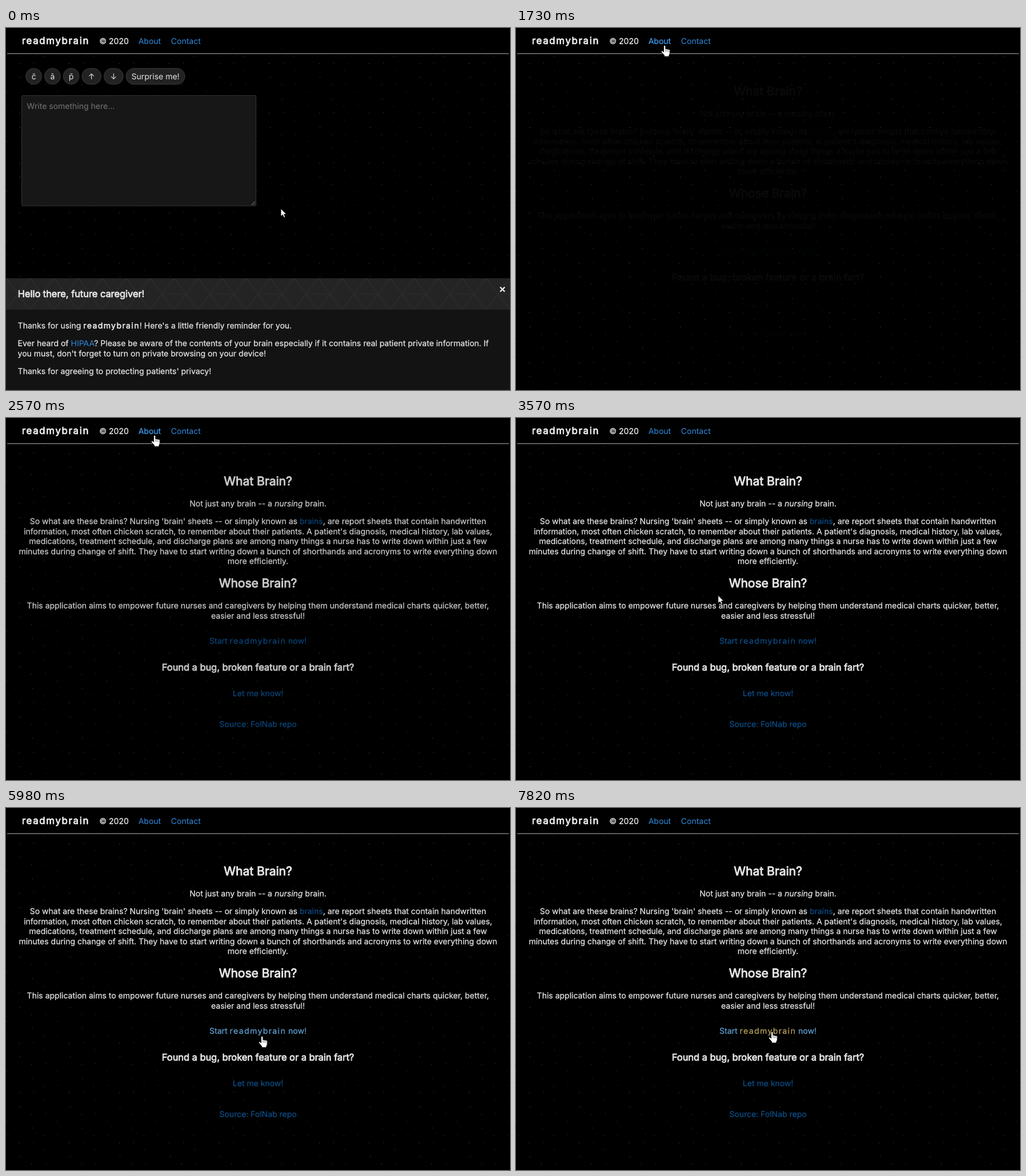
An HTML page for the animation above (8000 ms loop, 882 px wide and 635 px high).

```html
<!DOCTYPE html>
<html lang="en">
<head>
<meta charset="utf-8">
<title>readmybrain</title>
<style>
  html, body { margin: 0; width: 100%; height: 100%; overflow: hidden; background: #000; }
  svg { display: block; width: 882px; height: 635px; }
  text {
    font: 400 14px Inter, "Open Sans", sans-serif;
    font-optical-sizing: none;
    text-rendering: geometricPrecision;
    fill: #e6e6e6;
  }
  .mid text { text-anchor: middle; }
  .body text { stroke: #e6e6e6; stroke-width: .25px; }
  .body text.h2 { font-size: 21px; stroke-width: .95px; }
  .body text.h3 { font-size: 16.38px; stroke-width: .8px; }
  .logo { letter-spacing: .1em; }
  .nav text { fill: #2f8adf; }
  .nav text.plain { fill: #f0f0f0; stroke: #f0f0f0; stroke-width: .25px; }
  .nav text.logo { font-size: 16.8px; stroke-width: .8px; }
  .nav text.hover { fill: #3fa2f7; stroke: #3fa2f7; stroke-width: .2px; }
  .body .link { fill: #0d5290; stroke: #0d5290; stroke-width: .15px; }
  .body .link.hover { fill: #62a0d2; stroke: #62a0d2; stroke-width: .25px; }
  .body .blue { fill: #2f8adf; stroke: none; }
  .body .strong { stroke-width: .6px; }
  .pill { fill: #222; stroke: #363636; }
  .halo { fill: #161616; }
</style>
</head>
<body>
<svg viewBox="0 0 882 635">
  <defs>
    <pattern id="stars" width="175" height="175" patternUnits="userSpaceOnUse"></pattern>
    <pattern id="tri" width="84" height="56" patternUnits="userSpaceOnUse" y="439">
      <path d="M0 56L42 0L84 56M21 28H63L42 56ZM0 0L21 28M84 0L63 28M0 56H84" fill="none" stroke="#2d2d2d" stroke-width="1.2"/>
    </pattern>
  </defs>
  <rect width="882" height="635"/>
  <rect width="882" height="635" fill="url(#stars)"/>
  <rect width="882" height="44" opacity=".6"/>

  <g class="nav">
    <text class="plain logo" x="27.9" y="28">readmybrain</text>
    <text class="plain" x="163.3" y="28">© 2020</text>
    <text id="about" x="231.7" y="28">About</text>
    <text x="288.8" y="28">Contact</text>
    <rect x="2" y="44" width="878" height="1.75" fill="#686c6a"/>
  </g>

  <g id="home">
    <g id="pills" class="mid"></g>
    <rect id="area" x="27.5" y="118.5" width="410" height="193.5" rx="1.5" fill="#171717" stroke="#333"/>
    <text x="36.6" y="142" style="fill:#757575">Write something here...</text>
    <path d="M429.5 310.5L436 304M433 310.5L436 307.5" stroke="#999" stroke-width=".9"/>
    <rect y="439" width="882" height="55" fill="#242424"/>
    <rect y="439" width="882" height="55" fill="url(#tri)"/>
    <rect y="494" width="882" height="141" fill="#131313"/>
    <path d="M864.8 454.5l8 8m0-8l-8 8" stroke="#f2f2f2" stroke-width="2.3"/>
    <g class="body">
      <text class="h3" x="20.8" y="472">Hello there, future caregiver!</text>
      <text x="20.6" y="527">Thanks for using <tspan class="logo strong">readmybrain</tspan>! Here's a little friendly reminder for you.</text>
      <text x="20.6" y="558">Ever heard of <tspan class="blue">HIPAA</tspan>? Please be aware of the contents of your brain especially if it contains real patient private information. If</text>
      <text x="20.6" y="575.5">you must, don't forget to turn on private browsing on your device!</text>
      <text x="20.6" y="607">Thanks for agreeing to protecting patients' privacy!</text>
    </g>
  </g>

  <g id="info" class="mid body">
    <text class="h2" x="441" y="118">What Brain?</text>
    <text x="441" y="155">Not just any brain -- a <tspan font-style="italic">nursing</tspan> brain.</text>
    <text x="441" y="186">So what are these brains? Nursing 'brain' sheets -- or simply known as <tspan id="brains" class="link">brains</tspan>, are report sheets that contain handwritten</text>
    <text x="441" y="204">information, most often chicken scratch, to remember about their patients. A patient's diagnosis, medical history, lab values,</text>
    <text x="441" y="221">medications, treatment schedule, and discharge plans are among many things a nurse has to write down within just a few</text>
    <text x="441" y="239">minutes during change of shift. They have to start writing down a bunch of shorthands and acronyms to write everything down</text>
    <text x="441" y="256">more efficiently.</text>
    <text class="h2" x="441" y="297">Whose Brain?</text>
    <text x="441" y="334">This application aims to empower future nurses and caregivers by helping them understand medical charts quicker, better,</text>
    <text x="441" y="351.5">easier and less stressful!</text>
    <text id="start" class="link" x="441" y="396">Start <tspan id="brand" class="logo">readmybrain</tspan> now!</text>
    <text class="h3" x="441" y="442.5">Found a bug, broken feature or a brain fart?</text>
    <text class="link" x="441" y="488">Let me know!</text>
    <text class="link" x="441" y="542">Source: FolNab repo</text>
  </g>

  <g id="status">
    <rect y="621" width="290" height="14" fill="#292a2d"/>
    <text x="4" y="631.6" style="font-size:10.5px;fill:#bdc1c6">https://example.org/nursing-brain-report-sheets</text>
  </g>
  <circle id="click" cx="259" cy="30" r="13" fill="#ffee00" opacity=".53"/>
  <g id="cursor" stroke="#000" stroke-width=".8">
    <path id="arrow" d="M0 0V13.5L3.2 10.6L5.4 15.4L7.6 14.5L5.5 9.7H9.6Z" fill="#fff"/>
    <g id="hand" transform="translate(-5 0)">
      <path d="M4.5 2a1.6 1.6 0 0 1 3.2 0V7.2a1.4 1.4 0 0 1 2.6.4a1.4 1.4 0 0 1 2.5.6a1.3 1.3 0 0 1 2.4.9V14q0 2-1.4 3.6V20H5.6V18L1 12.6q-1.2-1.6 0-2.4q1.1-.7 2.4.8l1.1 1.2Z" fill="#fff"/>
      <path d="M7.8 8v3.5M10.3 8.6v3M12.8 9.4v2.3" stroke-width=".6"/>
    </g>
  </g>
</svg>
<script>
const LOOP = 8000;
const $ = id => document.getElementById(id);
const clamp = v => Math.max(0, Math.min(1, v));
const mix = (a, b, f) => a + (b - a) * f;

function add(parent, tag, attrs, text) {
  const el = document.createElementNS('http://www.w3.org/2000/svg', tag);
  for (const k in attrs) el.setAttribute(k, attrs[k]);
  if (text) el.textContent = text;
  parent.append(el);
}

// Evenly scattered stars repeat every 87.5px, snapped to whole pixels
const PERIOD = 87.5;
for (let i = 1; i <= 24; i++) {
  const opacity = i <= 10 ? .45 + .1 * (i % 4) : .15;
  for (let tile = 0; tile < 4; tile++) {
    const x = Math.floor((i * .7549 % 1 + tile % 2) * PERIOD);
    const y = Math.floor((i * .5698 % 1 + (tile >> 1)) * PERIOD);
    add($('stars'), 'rect', { x, y, width: 1, height: 1, fill: '#37a040', opacity });
  }
}

// Button row, laid out left to right
let left = 35;
for (const label of ['c\u0304', 'ā', 'p\u0304', '↑', '↓', 'Surprise me!']) {
  const width = label.length > 2 ? 102.5 : '↑↓'.includes(label) ? 33.2 : 27.3;
  add($('pills'), 'rect', { class: 'halo', x: left - 1, y: 70, width: width + 2, height: 29.5, rx: 14.7 });
  add($('pills'), 'rect', { class: 'pill', x: left, y: 71, width, height: 27.5, rx: 13.7 });
  add($('pills'), 'text', { x: left + width / 2, y: 90 }, label);
  left += width + 5.4;
}

// Pointer moves, each from where the last one ended
const moves = [
  { from: 20, to: 770, x: 258, y: 32 },
  { from: 1100, to: 1490, x: 259, y: 30 },
  { from: 3190, to: 3620, x: 355, y: 315 },
  { from: 3620, to: 4030, x: 498, y: 203 },
  { from: 4040, to: 4290, x: 528, y: 186 },
  { from: 5290, to: 5980, x: 447, y: 400 },
  { from: 6140, to: 6280, x: 447, y: 392 },
];

function pointer(t) {
  let x = 481, y = 317;
  for (const m of moves) {
    const f = 1 - (1 - clamp((t - m.from) / (m.to - m.from))) ** 2;
    x = mix(x, m.x, f);
    y = mix(y, m.y, f);
  }
  return [x, y];
}

const show = (id, on) => { $(id).style.display = on ? '' : 'none'; };
const hover = (id, on) => $(id).classList.toggle('hover', on);

function draw(t) {
  const [x, y] = pointer(t);
  const onAbout = t >= 1170 && t < 3260;
  const onBrains = t >= 4190 && t < 5400;
  const onStart = t >= 5890;

  show('home', t < 1730);
  show('info', t >= 1730);
  $('info').setAttribute('opacity', clamp((t - 1690) / 1000));

  hover('about', onAbout);
  hover('brains', onBrains);
  hover('start', onStart);
  const gold = clamp((t - 6280) / 1540);
  const tint = `rgb(${mix(98, 185, gold)},${mix(160, 162, gold)},${mix(210, 92, gold)})`;
  $('brand').style.fill = $('brand').style.stroke = onStart ? tint : '';

  show('status', t >= 4440 && t < 5500);
  $('status').setAttribute('opacity', clamp((t - 4360) / 160));
  show('click', t >= 1490 && t < 1730);

  const hand = onAbout || onBrains || onStart;
  show('hand', hand);
  show('arrow', !hand);
  $('cursor').setAttribute('transform', `translate(${x.toFixed(1)} ${y.toFixed(1)})`);
}

const begin = performance.now();
function loop() {
  draw((performance.now() - begin) % LOOP);
  requestAnimationFrame(loop);
}
loop();
</script>
</body>
</html>
```
